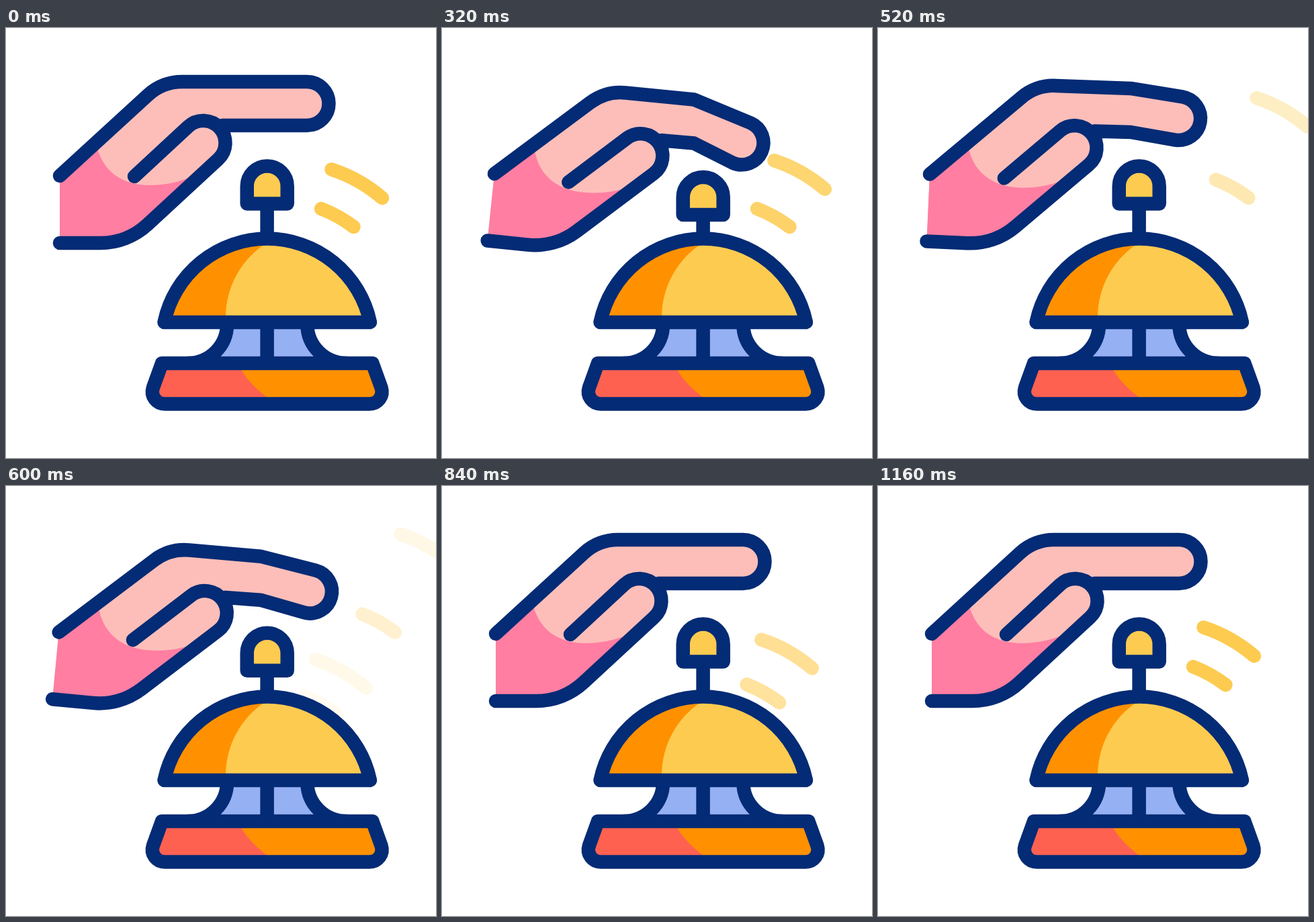
Animation, 640 px wide and 640 px high, one loop 1480 ms. Source, as an HTML page with a canvas:

```html
<!DOCTYPE html>
<html lang="en">
<head>
<meta charset="utf-8">
<title>Service bell</title>
<style>
  html, body { margin: 0; width: 100%; height: 100%; overflow: hidden; background: #fff; }
  canvas { display: block; width: 640px; height: 640px; }
</style>
</head>
<body>
<canvas id="stage" width="640" height="640"></canvas>
<script>
const ctx = document.getElementById('stage').getContext('2d');
const LOOP = 1480, STEP = 40;
const NAVY = '#042b75', SKIN = '#fdbeb9', PINK = '#ff7ea2', YELLOW = '#fdcb50',
      ORANGE = '#ff9100', RED = '#ff6151', BLUE = '#95b0f3';

const clamp = x => Math.min(1, Math.max(0, x));
const part = (t, a, b) => clamp((t - a) / (b - a));
const ease = u => u * u * (3 - 2 * u);

// Eased interpolation through [time, values] keys
function track(keys, t) {
  let i = 0;
  while (i < keys.length - 2 && t >= keys[i + 1][0]) i++;
  const [t0, a] = keys[i], [t1, b] = keys[i + 1];
  const u = ease(part(t, t0, t1));
  return a.map((v, k) => v + (b[k] - v) * u);
}

// Wrist x, y, palm angle, knuckle x, y, fingertip x, y
const REST = [80, 220, 0, 386, 80, 448, 112.5];
const HAND = [
  [120, REST],
  [270, [78.2, 216.9, 6.57, 375, 109.9, 445.9, 178]],
  [480, [76.6, 217.5, 1.9, 375.4, 86.4, 446.3, 129]],
  [630, [78.8, 217.7, 5.83, 379, 106.8, 453.2, 160.3]],
  [840, REST]
];
const KNOB = [[170, [0]], [270, [19.3]], [480, [0]], [530, [0]], [630, [17]], [840, [0]]];

// move/fade: [start, end] times; out/back: offsets
const SPARKS = [
  { line: 'M484.5 210.5Q526 224 560 253',
    out: { by: [113, -152], move: [240, 680], fade: [240, 660] },
    back: { by: [-24.5, 48.7], move: [560, 1040], fade: [540, 1030] } },
  { line: 'M469 269Q495 279 517.5 296',
    out: { by: [102, -130], move: [350, 790], fade: [250, 730] },
    back: { by: [-25.4, 43.5], move: [600, 1160], fade: [560, 1060] } }
].map(s => ({ ...s, line: new Path2D(s.line) }));

const shape = d => new Path2D(d);
const BELL = {
  neck: shape('M329 438C329 473 303 499 270 499H507.4C474.4 499 448.4 473 448.4 438Z'),
  neckLines: shape('M329 441C329 473 303 499 270 499M448.4 441C448.4 473 474.4 499 507.4 499M388.6 438V499'),
  base: shape('M232 499H545.4L558.6 535.5C562.5 548 553.5 559.5 541 559.5H236.4C223.9 559.5 214.9 548 218.8 535.5Z'),
  baseShade: shape('M232 499H345C354 520 373 540 402 559.5H236.4C223.9 559.5 214.9 548 218.8 535.5Z'),
  dome: shape('M235.5 438A156.6 156.6 0 0 1 542 438Z'),
  domeShade: shape('M235.5 438A156.6 156.6 0 0 1 388.7 313.5L386 321C350 345 327 385 327 432V438Z'),
  stem: shape('M388.6 262V312'),
  knob: shape('M358.7 261.5V235.5A30 30 0 0 1 418.7 235.5V261.5Z')
};

function fill(color, path) {
  ctx.fillStyle = color;
  path ? ctx.fill(path) : ctx.fill();
}
function line(path, color = NAVY) {
  ctx.strokeStyle = color;
  path ? ctx.stroke(path) : ctx.stroke();
}

function drawSpark(path, x, y, alpha) {
  if (alpha <= 0) return;
  ctx.save();
  ctx.globalAlpha = alpha;
  ctx.translate(x, y);
  line(path, YELLOW);
  ctx.restore();
}

function drawSparks(t) {
  for (const { line: path, out, back } of SPARKS) {
    const go = ease(part(t, ...out.move));
    drawSpark(path, out.by[0] * go, out.by[1] * go, 1 - part(t, ...out.fade));
    const left = 1 - ease(part(t, ...back.move));
    drawSpark(path, back.by[0] * left, back.by[1] * left, part(t, ...back.fade));
  }
}

function drawBell(t) {
  fill(BLUE, BELL.neck);
  line(BELL.neckLines);
  fill(ORANGE, BELL.base);
  fill(RED, BELL.baseShade);
  line(BELL.base);
  line(BELL.stem);
  fill(YELLOW, BELL.dome);
  fill(ORANGE, BELL.domeShade);
  line(BELL.dome);
  ctx.save();
  ctx.translate(0, track(KNOB, t)[0]);
  fill(YELLOW, BELL.knob);
  line(BELL.knob);
  ctx.restore();
}

function drawHand(t) {
  const [wx, wy, deg, kx, ky, tx, ty] = track(HAND, t);
  const turn = deg * Math.PI / 180;
  const tilt = Math.atan2(ty - ky - 32.5, tx - kx);
  const palm = () => {
    ctx.setTransform(1, 0, 0, 1, wx, wy);
    ctx.rotate(turn);
    ctx.translate(-80, -220);
  };
  const world = () => ctx.setTransform(1, 0, 0, 1, 0, 0);

  // Wrist, back of the hand and index finger
  const upper = () => {
    palm();
    ctx.moveTo(80, 220);
    ctx.arcTo(232.8, 80, 262, 80, 75);
    ctx.lineTo(262, 80);
    world();
    ctx.lineTo(kx, ky);
    ctx.arc(tx, ty, 32.5, tilt - Math.PI / 2, tilt + Math.PI / 2);
    ctx.lineTo(kx, ky + 65);
    palm();
    ctx.lineTo(322, 145);
  };
  const wrist = () => {
    ctx.arcTo(180.7, 320, 80, 320, 104);
    ctx.lineTo(80, 320);
  };
  const thumb = () => {
    ctx.arc(293.5, 171, 33, -2.315, 0.827);
    wrist();
  };

  ctx.beginPath();
  upper();
  thumb();
  ctx.closePath();
  fill(SKIN);

  ctx.beginPath();
  ctx.moveTo(80, 220);
  ctx.lineTo(134, 170);
  ctx.bezierCurveTo(142, 215, 175, 234, 213, 234);
  ctx.bezierCurveTo(238, 234, 258, 229, 280, 220);
  ctx.lineTo(272, 235.8);
  wrist();
  ctx.closePath();
  fill(PINK);

  ctx.beginPath();
  upper();
  ctx.moveTo(191, 221);
  thumb();
  line();
  world();
}

function draw(now) {
  const t = Math.floor(now % LOOP / STEP) * STEP;
  ctx.setTransform(1, 0, 0, 1, 0, 0);
  fill('#fff', shape('M0 0H640V640H0Z'));
  ctx.lineWidth = 20.5;
  ctx.lineCap = ctx.lineJoin = 'round';
  drawSparks(t);
  drawBell(t);
  drawHand(t);
}

const start = performance.now();
function tick() {
  draw(performance.now() - start);
  requestAnimationFrame(tick);
}
tick();
</script>
</body>
</html>
```
